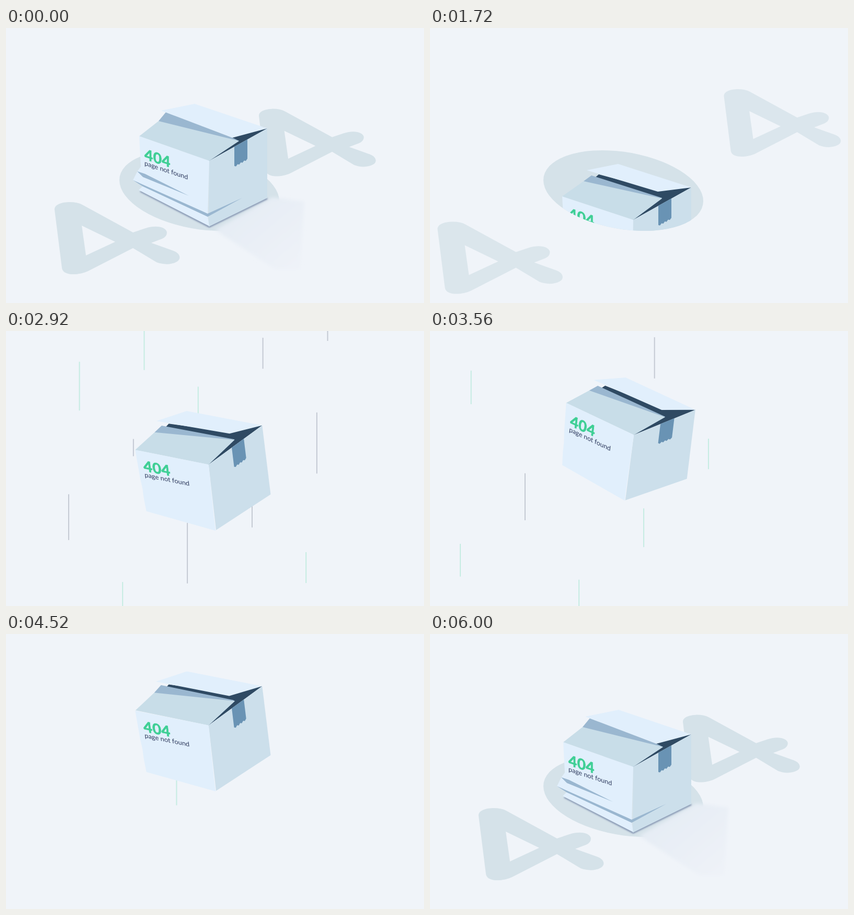
Recreate the animation shown at these times as an HTML page. Size 800 by 526 pixels, loop 6800 ms.

```html
<!DOCTYPE html>
<html lang="en">
<head>
<meta charset="utf-8">
<title>404</title>
<style>
  html, body { margin: 0; height: 100%; overflow: hidden; background: #f0f4f9; }
  svg { display: block; width: 100%; height: 100%; }
  text { font-family: Lato, sans-serif; }
</style>
</head>
<body>
<svg viewBox="0 0 800 526">
  <defs>
    <path id="four" fill-rule="evenodd" d="M93 348C92 338 106 333 122 333Q137 333 146 338L243 391L267 383C288 376 307 381 308 391Q308 399 299 403L278 411L320 426C334 431 336 442 327 447C315 454 298 452 288 448L243 421L157 465C140 473 109 475 107 459ZM145 378L153 435L209 409Z"/>
    <linearGradient id="fade" gradientUnits="userSpaceOnUse" x1="430" y1="345" x2="535" y2="470">
      <stop stop-color="#e5ecf4"/><stop offset="1" stop-color="#eef2f8"/>
    </linearGradient>
    <filter id="blur"><feGaussianBlur stdDeviation="1.6"/></filter>
    <filter id="soft"><feGaussianBlur stdDeviation="3"/></filter>
    <clipPath id="aboveHole"><path transform="matrix(153 20 0 74.4 370 311)" d="M-1 0V-9H1V0A1 1 0 0 1-1 0Z"/></clipPath>
  </defs>
  <g id="streaks"></g>
  <g fill="#d5e2e9">
    <use id="left" href="#four"/>
    <g id="right"><use href="#four" transform="translate(397.2 -156.4) scale(.934)"/></g>
    <circle id="hole" r="1"/>
  </g>
  <path id="cast" d="M400 386L514 461H563L571 332L510 324Z" fill="url(#fade)" filter="url(#soft)"/>
  <g id="clip">
    <g id="box">
      <path id="contact" d="M257 312L389 380L500 326" fill="none" stroke="#5d6f96" stroke-width="3" filter="url(#blur)"/>
      <path fill="#2f4a63" d="M389 254L316 173L323 167L433 196L500 192Z"/>
      <polygon id="strip" fill="#9ab7d0"/>
      <polygon id="nearFlap" fill="#c8dde8"/>
      <polygon id="farFlap" fill="#e1effc"/>
      <path fill="#ccdfeb" d="M389 254L500 192V325L388 380Z"/>
      <polygon id="face" fill="#e1effc"/>
      <g id="creases" fill="#9ab7d0">
        <path d="M251 274L266 279L350 321L262 285Z"/>
        <path d="M243 291L265 292L386 355L452 325L386 361L262 303Z"/>
        <path d="M243 291L257 284L386 349V355Z" fill="#e1effc"/>
      </g>
      <polygon id="tape" fill="#6993b4"/>
      <text transform="matrix(1 .32 0 1 265 251)" font-size="28" font-weight="700" letter-spacing=".4" fill="#3fcf95" stroke="#3fcf95" stroke-width=".8" stroke-linejoin="round">404</text>
      <text transform="matrix(1 .33 0 1 265 262.5)" font-size="12.5" fill="#2f3b5e">page not found</text>
    </g>
  </g>
</svg>
<script>
const LOOP = 6800, HEIGHT = 526, SPEED = 1.3;
const el = id => document.getElementById(id);
const clamp = (v, low, high) => Math.min(high, Math.max(low, v));
const progress = (t, from, to) => clamp((t - from) / (to - from), 0, 1);
const mix = (a, b, p) => a + (b - a) * p;
const smooth = p => p * p * (3 - 2 * p);
const easeOut = (p, power) => 1 - (1 - p) ** power;

function morph(id, a, b, p) {
  el(id).setAttribute('points', a.map((v, i) => mix(v, b[i], p)).join(' '));
}

let seed = 7;
const random = () => (seed = seed * 16807 % 2147483647) / 2147483647;

// Streaks rise on evenly spaced columns and thin out towards the end.
const streaks = [];
function addStreak(column, start, length, color) {
  const line = document.createElementNS('http://www.w3.org/2000/svg', 'rect');
  line.setAttribute('x', 57 + 20.65 * column);
  line.setAttribute('width', 2);
  line.setAttribute('height', length);
  line.setAttribute('fill', color);
  el('streaks').append(line);
  streaks.push({ line, start });
}
for (let i = 0; i < 38; i++)
  addStreak(i * 11 % 28, 2340 + 1680 * (i / 38) ** 1.3, 20 + 105 * random(), random() < .5 ? '#c5ece2' : '#c4c9d3');
addStreak(13, 4323, 59, '#c5ece2');

function drawTape() {
  const points = ['437 227', '462 213'];
  for (let i = 0; i <= 8; i++)
    points.push([462 - i * 25 / 8, 250 + i * 14 / 8 + i % 2 * 2.5]);
  el('tape').setAttribute('points', points.join(' '));
}

function boxHeight(t) {
  if (t < 2000) return 350 * progress(t, 1380, 1980) ** 2;
  if (t < 2720) return mix(-430, 32, easeOut(progress(t, 2360, 2720), 3));
  const floating = mix(32, -78, easeOut(progress(t, 2720, 4520), 2.6));
  const windUp = -25 * smooth(progress(t, 4520, 4960));
  return (floating + windUp) * (1 - progress(t, 4960, 5160) ** 2);
}

function boxTilt(t) {
  const swing = clamp(1.25 * Math.cos((t - 2920) / 800 * Math.PI), -1, 1);
  return t < 2300 ? 0 : -7 * swing * (1 - progress(t, 4960, 5160));
}

function holeSize(t) {
  if (t < 2400) return (1 - progress(t, 1900, 2300)) ** 1.3;
  return 1.5 * easeOut(progress(t, 5160, 5320), 3) - .5 * smooth(progress(t, 5320, 5560));
}

function flapLift(t) {
  const opening = .5 * progress(t, 1280, 1400) + .5 * progress(t, 1400, 1600);
  return opening - .3 * smooth(progress(t, 3700, 4500)) - .7 * smooth(progress(t, 5040, 5240));
}

function drawBox(t) {
  if (t > 1380 && t < 2300) el('clip').setAttribute('clip-path', 'url(#aboveHole)');
  else el('clip').removeAttribute('clip-path');
  el('box').setAttribute('transform', `translate(0 ${boxHeight(t)}) rotate(${boxTilt(t)} 378 264)`);

  const lift = flapLift(t);
  morph('strip', [292, 178, 306, 161, 436, 211, 446, 216, 389, 254], [294, 180, 309, 169, 444, 212, 444, 213, 389, 254], lift);
  morph('nearFlap', [255, 207, 292, 178, 446, 216, 389, 254], [253, 209, 294, 180, 444, 213, 389, 254], lift);
  morph('farFlap', [297, 158, 361, 145, 500, 192, 433, 210], [300, 159, 360, 147, 500, 192, 436, 200], lift);

  const crush = 1 - smooth(progress(t, 1400, 1700)) + easeOut(progress(t, 5140, 5280), 3);
  morph('face',
    [253, 209, 389, 254, 387, 355, 387, 381, 260, 328, 259, 315, 258, 300, 258, 285, 256, 265],
    [255, 207, 389, 254, 386, 361, 389, 379, 254, 310, 262, 302, 243, 291, 251, 275, 258, 265], crush);
  el('creases').setAttribute('opacity', crush);
  el('contact').setAttribute('opacity', crush * .8);
}

function drawGround(t) {
  const leaving = progress(t, 1320, 1960);
  const returned = progress(t, 5640, 5840);
  const shift = returned ? 0 : 200 * leaving ** 2;
  for (const [id, side] of [['left', -1], ['right', 1]]) {
    el(id).setAttribute('transform', `translate(${side * shift} ${-side * shift * .478})`);
    el(id).setAttribute('opacity', returned || 1 - progress(leaving, .5, 1));
  }
  el('cast').setAttribute('opacity', returned || 1 - progress(t, 1280, 1560));

  const size = holeSize(t);
  el('hole').setAttribute('transform', `translate(370 ${313 - 2 * Math.min(1, size)}) scale(${size}) matrix(153 20 0 74.4 0 0)`);
}

function draw(t) {
  for (const { line, start } of streaks)
    line.setAttribute('y', HEIGHT - (t - start) * SPEED);
  drawGround(t);
  drawBox(t);
}

function frame() {
  draw(performance.now() % LOOP);
  requestAnimationFrame(frame);
}
drawTape();
frame();
</script>
</body>
</html>
```
